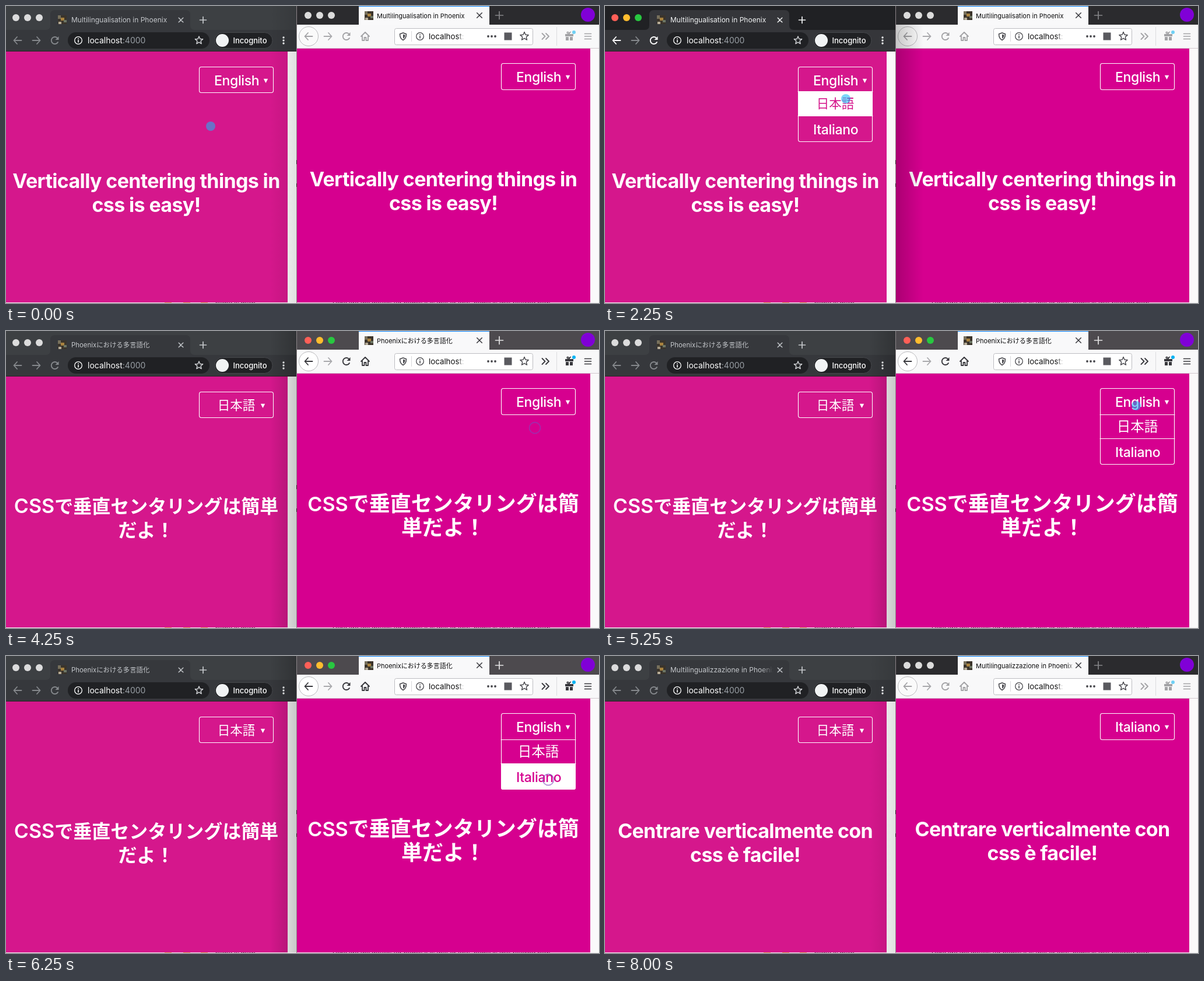
Write an HTML page that moves like this. It is 1017 px wide and 509 px high and loops after 8250 ms.

```html
<!DOCTYPE html>
<html lang="en">
<head>
<meta charset="utf-8">
<title>Language switcher</title>
<style>
  html, body { margin: 0; width: 100%; height: 100%; overflow: hidden; background: #fff; }
  svg { display: block; width: 1017px; height: 509px; }
  text { font-family: Inter, "Noto Sans CJK JP", "Noto Sans CJK", sans-serif; white-space: pre; }
  .head { font-size: 34px; font-weight: 700; letter-spacing: -.65px; fill: #fff; text-anchor: middle; }
  .ja { letter-spacing: 0; }
  .opt { font-size: 23px; font-weight: 500; letter-spacing: -.35px; }
  .line { fill: none; stroke-linecap: round; stroke-linejoin: round; }
</style>
</head>
<body>
<svg id="stage" viewBox="0 0 1017 509"></svg>
<script>
const LOOP = 8250, STEP = 250;
const stage = document.getElementById('stage');

const TITLES = {
  en: 'Multilingualisation in Phoenix',
  ja: 'Phoenixにおける多言語化',
  it: 'Multilingualizzazione in Phoenix'
};
const NAMES = { en: 'English', ja: '日本語', it: 'Italiano' };
const HEADS = {
  en: ['Vertically centering things in', 'css is easy!'],
  it: ['Centrare verticalmente con', 'css è facile!']
};
const LEFT = { pink: '#d5178c', x: 331, y: 104, h: 45, rows: [146, 188, 233], kanji: 21.5,
  mid: 240.5, base: 312, cjk: 32, ja: ['で垂直センタリングは簡単', 'だよ！'] };
const RIGHT = { pink: '#d6008f', x: 849, y: 98, h: 46, rows: [143, 184, 229], kanji: 23.5,
  mid: 750, base: 309, cjk: 36, ja: ['で垂直センタリングは簡', '単だよ！'] };

// Pointer waypoints: time, x, y
const PATH = [
  [0, 351, 206], [500, 392, 167], [750, 394, 166], [1250, 397, 128], [1750, 402, 132],
  [2250, 413, 159], [2750, 413, 160], [3000, 450, 180], [3500, 691, 205],
  [4000, 905, 167], [4250, 907, 166], [4750, 908, 125], [5250, 911, 128],
  [5500, 920, 165], [5750, 930, 212], [7500, 930, 212]
];
const CLICKS = [750, 1500, 2500, 4250, 5000, 6250];

const rect = (x, y, w, h, fill, more = '') =>
  `<rect x="${x}" y="${y}" width="${w}" height="${h}" fill="${fill}" ${more}/>`;
const disc = (x, y, r, fill, more = '') => `<circle cx="${x}" cy="${y}" r="${r}" fill="${fill}" ${more}/>`;
const ring = (x, y, r, color, w) => disc(x, y, r, 'none', `stroke="${color}" stroke-width="${w}"`);
const line = (d, color, w = 1.6) => `<path class="line" d="${d}" stroke="${color}" stroke-width="${w}"/>`;
const text = (x, y, size, fill, str, more = '') =>
  `<text x="${x}" y="${y}" font-size="${size}" fill="${fill}" ${more}>${str}</text>`;
const fade = (id, x1, x2, color) =>
  `<linearGradient id="${id}" gradientUnits="userSpaceOnUse" x1="${x1}" x2="${x2}" y1="0" y2="0">
   <stop stop-color="${color}"/><stop offset="1" stop-color="${color}" stop-opacity="0"/></linearGradient>`;

function star(x, y, r, color) {
  const pts = Array.from({ length: 10 }, (_, i) => {
    const a = i * Math.PI / 5, k = i % 2 ? r * .45 : r;
    return `${(x + k * Math.sin(a)).toFixed(1)} ${(y - k * Math.cos(a)).toFixed(1)}`;
  });
  return line(`M${pts.join('L')}Z`, color, 1.4);
}
const arrow = (x, y, dir, color) =>
  line(`M${x - 6.5 * dir} ${y}H${x + 6.5 * dir}M${x + dir} ${y - 6}L${x + 6.5 * dir} ${y}L${x + dir} ${y + 6}`, color, 1.8);
const reload = (x, y, color) =>
  line(`M${x + 5} ${y + 3}A6 6 0 1 1 ${x + 4} ${y - 4.2}`, color, 1.9) +
  `<path d="M${x + 6.5} ${y - 7}V${y - 1}H${x + .5}Z" fill="${color}"/>`;
const cross = (x, y, r, color) =>
  line(`M${x - r} ${y - r}L${x + r} ${y + r}M${x + r} ${y - r}L${x - r} ${y + r}`, color, 1.5);
const plus = (x, y, r, color) => line(`M${x - r} ${y}H${x + r}M${x} ${y - r}V${y + r}`, color, 1.7);
const info = (x, y, color) =>
  ring(x, y, 6.3, color, 1.3) + rect(x - .8, y - 1, 1.6, 4.5, color) + rect(x - .8, y - 3.7, 1.6, 1.6, color);
const lights = (x, y, on) => ['#ff5f57', '#febc2e', '#28c840']
  .map((c, i) => disc(x + i * 20, y, 6, on ? c : '#dcdcdc')).join('');
const favicon = (x, y) =>
  rect(x, y, 15, 15, '#3b342b') + rect(x, y, 5, 6, '#77705c') + rect(x + 5, y + 4, 6, 5, '#a8823f') +
  rect(x + 10, y + 8, 5, 4, '#6d7664') + rect(x + 1, y + 11, 5, 4, '#b5ab96');

function heading(p, lang) {
  return [0, 1].map(i => {
    const y = p.base + i * 41;
    if (lang !== 'ja') return `<text class="head" x="${p.mid}" y="${y}">${HEADS[lang][i]}</text>`;
    const latin = i ? '' : '<tspan font-weight="600">CSS</tspan>';
    return `<text class="head ja" x="${p.mid}" y="${y}">${latin}<tspan font-size="${p.cjk}">${p.ja[i]}</tspan></text>`;
  }).join('');
}

function option(p, lang, mid, fill) {
  const ja = lang === 'ja';
  const x = p.x + (ja ? 64 : 26), y = mid + (ja ? p.kanji * .38 : 8.3);
  const style = ja ? `text-anchor="middle" style="font-size:${p.kanji}px;letter-spacing:0"` : '';
  return `<text class="opt" x="${x}" y="${y}" fill="${fill}" ${style}>${NAMES[lang]}</text>`;
}

function dropdown(p, lang, open, hover) {
  const [a, b, c] = p.rows, mid = p.y + 23.3, tip = p.x + (lang === 'ja' ? 109.5 : 114.5);
  const h = open ? c - p.y : p.h;
  let s = '';
  if (open) {
    if (hover === 0) s += rect(p.x, a, 128, b - a, '#fff');
    if (hover === 1) s += rect(p.x, b, 128, c - b, '#fff', 'rx="3"');
    s += line(`M${p.x} ${a + .5}H${p.x + 128}M${p.x} ${b + .5}H${p.x + 128}`, '#fff', 1);
    s += option(p, 'ja', (a + b) / 2, hover === 0 ? p.pink : '#fff');
    s += option(p, 'it', (b + c) / 2 + .8, hover === 1 ? p.pink : '#fff');
  }
  s += rect(p.x + .5, p.y + .5, 127, h - 1, 'none', 'rx="3.5" stroke="#fff" stroke-width="1.1"');
  s += option(p, lang, mid, '#fff');
  return s + `<path d="M${tip - 3.7} ${mid - 2.5}h7.4l-3.7 7.2z" fill="#fff"/>`;
}

function leftWindow(s) {
  const on = s.leftOn, nav = on ? '#fff' : '#85888c', bar = on ? '#35363a' : '#36383c';
  const ink = on ? '#f1f3f4' : '#c3c6ca', pill = '#202124';
  return rect(0, 0, 498, 78, on ? '#202124' : '#3d4043') +
    `<path d="M68 41Q76 41 76 33V15Q76 7 84 7H308Q316 7 316 15V33Q316 41 324 41Z" fill="${bar}"/>` +
    rect(0, 41, 498, 36, bar) + rect(0, 77, 498, 1, '#2a2226') +
    lights(17, 20, on) + favicon(89, 16) +
    fade('lt', s.page === 'it' ? 268 : 284, 289, ink) +
    text(112, 28, s.page === 'ja' ? 11.4 : 12, 'url(#lt)', TITLES[s.page]) +
    cross(300, 24, 3.8, ink) + plus(338, 24, 5.5, ink) +
    arrow(20, 59, -1, nav) + arrow(52, 59, 1, '#85888c') + reload(84, 59, nav) +
    rect(106, 45, 243, 28, pill, 'rx="14"') + info(124, 59, '#fff') +
    text(140, 64, 14, '#fff', 'localhost<tspan fill="#9aa0a6">:4000</tspan>') +
    star(331, 59, 7, '#d5d7da') +
    rect(358, 45.5, 99, 27, pill, 'rx="13.5" stroke="#46484c"') + disc(371, 59, 11, '#f1f3f4') +
    text(389.5, 64, 13, '#fff', 'Incognito', 'font-weight="500"') +
    [54, 59, 64].map(y => disc(476, y, 1.7, '#f1f3f4')).join('') +
    rect(0, 78, 483, 430, LEFT.pink) + rect(483, 78, 15, 430, '#fafafa') +
    heading(LEFT, s.page) + dropdown(LEFT, s.leftLang, s.leftOpen, s.hover);
}

function rightWindow(s) {
  const on = s.rightOn, ink = on ? '#38383d' : '#a3a3a6', dark = '#48484d';
  return rect(499, 0, 518, 32, on ? '#4d4a4e' : '#2b2b2e') + lights(518, 16, on) +
    rect(605, 0, 224, 32, '#f9f9fa') + rect(605, 0, 224, 1, '#0a84ff') + favicon(615, 9) +
    fade('rt', 794, 804, '#0c0c0d') + text(636, 20.5, 11, 'url(#rt)', TITLES[s.page]) +
    cross(812, 16, 4.3, '#38383d') + plus(846, 16, 6.5, on ? '#e4e4e4' : '#858588') +
    disc(998, 15, 12, '#8000d7') +
    rect(499, 32, 518, 40, '#f8f8f9') + rect(499, 72, 518, 1, '#d2c8ce') +
    disc(519, 52, 16.5, on ? '#fff' : '#fafafa', 'stroke="#b9b9bc"') +
    arrow(519, 52, -1, ink) + arrow(552, 52, 1, '#a9a9ac') + reload(584, 52, ink) +
    line('M609 52L616 45L623 52M611 51V59H614.5V54H617.5V59H621V51', ink, 1.8) +
    rect(666.5, 38.5, 237, 28, '#fff', 'rx="3" stroke="#bdbdc1"') +
    line('M681 46L686.5 48C686.5 54 684 57 681 58.5C678 57 675.5 54 675.5 48Z', dark, 1.5) +
    '<path d="M681 48.5V56C683.5 54.5 684.5 52 684.5 49.7Z" fill="#48484d"/>' +
    rect(695, 43, 1, 18, '#d7d7db') + info(710, 52, dark) +
    fade('url', 774, 786, '#0c0c0d') + text(725, 57, 13.3, 'url(#url)', 'localhost:') +
    [827, 833, 839].map(x => disc(x, 52, 1.9, dark)).join('') +
    rect(854.5, 45.5, 13, 13, '#5a5a5f') + star(889, 52, 7.6, dark) +
    line('M919.5 47L924.5 52L919.5 57M926 47L931 52L926 57', ink, 1.8) +
    rect(944, 36, 1, 32, '#dcdcdf') +
    rect(959, 48, 14, 4, ink) + rect(960, 53, 5, 6, ink) + rect(967, 53, 5, 6, ink) +
    line('M966 48C962 48 961 44 963.5 44.5Q965.5 45 966 48Q966.5 45 968.5 44.5', ink, 1.5) +
    disc(974, 45, 3, on ? '#00b3f4' : '#6fd0f5') +
    line('M992.5 47.5H1003.5M992.5 52H1003.5M992.5 56.5H1003.5', ink, 1.7) +
    rect(499, 73, 503, 435, RIGHT.pink) + rect(1002, 73, 15, 435, '#fafafa') +
    heading(RIGHT, s.page) + dropdown(RIGHT, s.rightLang, s.rightOpen, s.hover);
}

// Soft shadow the front window drops on its neighbour
function shadow(s) {
  if (s.leftOn) return fade('sh', 499, 546, 'rgba(0,0,0,.2)') + rect(499, 32, 47, 476, 'url(#sh)');
  return fade('sh', 498, 452, `rgba(0,0,0,${s.rightOn ? .2 : .1})`) + rect(452, 0, 46, 508, 'url(#sh)');
}

function desktop() {
  return rect(0, 0, 1017, 509, '#f4f4f4') + rect(498, 0, 1, 509, '#8d8589') +
    rect(497.5, 264, 1.5, 7, '#222') + rect(497.5, 304, 1.5, 6, '#222') +
    [272, 304, 334].map(x => rect(x, 508, 12, 1, '#e0c268')).join('') +
    text(359, 514, 11, '#333', 'home is main') +
    text(560, 514, 11, '#333', 'Here are the details for home: it is that or less, home is that reading now');
}

function pointer(t) {
  if (t > PATH[PATH.length - 1][0]) return '';
  const i = Math.max(1, PATH.findIndex(p => p[0] >= t));
  const [t0, x0, y0] = PATH[i - 1], [t1, x1, y1] = PATH[i];
  const k = (t - t0) / (t1 - t0), x = x0 + (x1 - x0) * k, y = y0 + (y1 - y0) * k;
  return CLICKS.includes(t) ? ring(x, y, 9.5, 'rgba(130,70,190,.6)', 1.8)
    : disc(x, y, 8, '#18b8f6', 'fill-opacity=".56"');
}

function stateAt(t) {
  const within = (a, b) => t >= a && t < b;
  return {
    page: t < 2500 ? 'en' : t < 6500 ? 'ja' : 'it',
    leftLang: t < 2500 ? 'en' : 'ja',
    rightLang: t < 6500 ? 'en' : 'it',
    leftOn: within(750, 4250),
    rightOn: within(4250, 7750),
    leftOpen: within(1500, 2500),
    rightOpen: within(5250, 6500),
    hover: within(2000, 2500) || within(5500, 5750) ? 0 : within(5750, 6500) ? 1 : -1
  };
}

let shown = -1;
function render(now) {
  const t = Math.floor(now % LOOP / STEP) * STEP;
  if (t !== shown) {
    shown = t;
    const s = stateAt(t);
    stage.innerHTML = desktop() + leftWindow(s) + rightWindow(s) + shadow(s) + pointer(t);
  }
  requestAnimationFrame(render);
}
render(performance.now());
</script>
</body>
</html>
```
